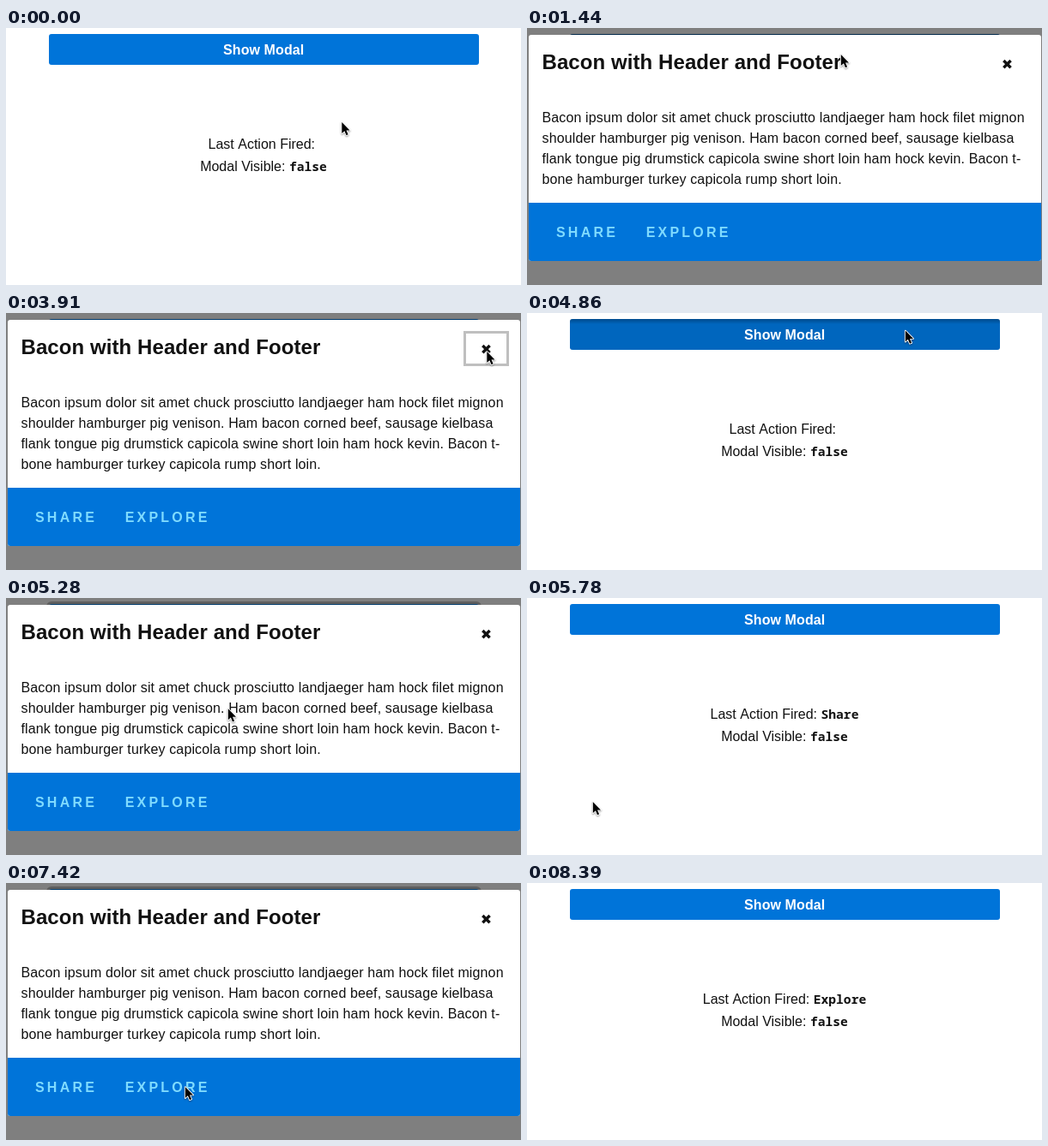
These frames come from a looping animation (600 px wide and 300 px high, 9140 ms). An HTML page with a canvas:

```html
<!DOCTYPE html>
<html lang="en">
<head>
<meta charset="utf-8">
<title>Modal demo</title>
<style>
  html, body { margin: 0; width: 100%; height: 100%; overflow: hidden; background: #fff; }
  canvas { display: block; width: 600px; height: 300px; }
</style>
</head>
<body>
<canvas id="stage" width="600" height="300"></canvas>
<script>
const ctx = document.getElementById('stage').getContext('2d');
const LOOP = 9140, STEP = 30;
const SANS = '"Liberation Sans", Arial, sans-serif';
const MONO = '"Noto Sans Mono", monospace';
const BLUE = '#0074d9', INK = '#111', RING = 'rgba(0,0,0,.25)';

const BODY = [
  'Bacon ipsum dolor sit amet chuck prosciutto landjaeger ham hock filet mignon',
  'shoulder hamburger pig venison. Ham bacon corned beef, sausage kielbasa',
  'flank tongue pig drumstick capicola swine short loin ham hock kevin. Bacon t-',
  'bone hamburger turkey capicola rump short loin.'
];

// open: modal appears, move: pointer leaves the trigger, press: a modal button is held, close: modal goes
const SESSIONS = [
  { down: 1440, open: 1440, move: 1950, press: 3910, close: 3940, target: 'close', action: '' },
  { down: 4860, open: 4890, move: 5070, press: 5750, close: 5780, target: 'share', action: 'Share' },
  { down: 6820, open: 6850, move: 7000, press: 7810, close: 7840, target: 'explore', action: 'Explore' }
];

const BUTTONS = {
  close: [536, 24, 47, 35],
  share: [18, 220, 104, 36],
  explore: [122.5, 220, 131, 36]
};

// Pointer moves; "via" bends the path
const START = [390.5, 108.5];
const MOVES = [
  { from: 570, to: 930, end: [365, 29.5] },
  { from: 1950, to: 2400, end: [549, 55], via: [490, 82] },
  { from: 2730, to: 2900, end: [559.5, 43.5] },
  { from: 4360, to: 4590, end: [440, 19] },
  { from: 5070, to: 5520, end: [76, 236.5] },
  { from: 6170, to: 6650, end: [394, 32] },
  { from: 7000, to: 7420, end: [208, 236.5] },
  { from: 8220, to: 8390, end: [415, 303] }
];

function box(x, y, w, h, r, fill) {
  ctx.beginPath();
  ctx.roundRect(x, y, w, h, r);
  ctx.fillStyle = fill;
  ctx.fill();
}

function ring([x, y, w, h], r) {
  ctx.beginPath();
  ctx.roundRect(x - 3, y - 3, w + 6, h + 6, r ? r + 3 : 0);
  ctx.roundRect(x, y, w, h, r);
  ctx.fillStyle = RING;
  ctx.fill('evenodd');
}

function text(str, x, y, font, color = INK, spacing = 0) {
  ctx.font = font;
  ctx.letterSpacing = spacing + 'px';
  ctx.fillStyle = color;
  ctx.fillText(str, x, y);
  return ctx.measureText(str).width;
}

function statusLine(label, value, y) {
  const plain = '16px ' + SANS, code = 'bold 14.67px ' + MONO;
  ctx.letterSpacing = '0px';
  ctx.font = plain;
  const labelWidth = ctx.measureText(label).width;
  ctx.font = code;
  const x = 300 - (labelWidth + ctx.measureText(value).width) / 2;
  text(label, x, y, plain);
  text(value, x + labelWidth, y, code);
}

function drawPage(pressed, focused, action) {
  const trigger = [50, 7, 501, 36];
  ctx.fillStyle = '#fff';
  ctx.fillRect(0, 0, 600, 300);
  if (focused) ring(trigger, 3);
  box(...trigger, 3, BLUE);
  if (pressed) {
    box(...trigger, 3, 'rgba(0,0,0,.125)');
    const shade = ctx.createLinearGradient(0, 7, 0, 13);
    shade.addColorStop(0, 'rgba(0,0,0,.25)');
    shade.addColorStop(.3, 'rgba(0,0,0,.19)');
    shade.addColorStop(1, 'rgba(0,0,0,0)');
    box(...trigger, 3, shade);
  }
  text('Show Modal', 253, 31, 'bold 16px ' + SANS, '#fff', 0.1);
  statusLine('Last Action Fired: ', action, 141);
  statusLine('Modal Visible: ', 'false', 167);
}

function drawModal(held) {
  ctx.fillStyle = 'rgba(0,0,0,.5)';
  ctx.fillRect(0, 0, 600, 300);
  box(2, 8, 597, 264, 3, '#fff');
  box(2, 204, 597, 68, [0, 0, 3, 3], BLUE);
  text('Bacon with Header and Footer', 17.5, 48, 'bold 24px ' + SANS, INK, 0.08);
  text('✖', 552.7, 48, 'bold 16px "DejaVu Sans", sans-serif');
  BODY.forEach((line, i) => text(line, 17.5, 110 + i * 24, '16px ' + SANS, INK, 0.13));
  const link = 'bold 16px ' + SANS;
  text('SHARE', 34, 244, link, '#7fdbff', 3.2);
  text('EXPLORE', 138.7, 244, link, '#7fdbff', 3.2);
  if (held) ring(BUTTONS[held], 0);
}

function pointerAt(t) {
  let pos = START;
  for (const { from, to, end, via } of MOVES) {
    if (t < from) break;
    if (t >= to) { pos = end; continue; }
    const k = (Math.floor((t - from) / STEP) + 1) * STEP / (to - from + STEP);
    const p = Math.min(1, k * k * (3 - 2 * k)), q = 1 - p, start = pos;
    pos = start.map((a, i) => {
      const mid = via ? via[i] : (a + end[i]) / 2;
      return q * q * a + 2 * q * p * mid + p * p * end[i];
    });
  }
  return pos;
}

const ARROW = new Path2D('M.8 1.6V14.6L3.9 11.7L6 16.7L8.1 15.8L6 10.9H10Z');

function drawPointer([x, y]) {
  ctx.save();
  ctx.translate(x, y);
  ctx.save();
  ctx.shadowColor = 'rgba(0,0,0,.4)';
  ctx.shadowBlur = 2;
  ctx.shadowOffsetY = 1;
  ctx.strokeStyle = '#fff';
  ctx.lineWidth = 1.8;
  ctx.lineJoin = 'round';
  ctx.stroke(ARROW);
  ctx.restore();
  ctx.fillStyle = '#000';
  ctx.fill(ARROW);
  ctx.restore();
}

function draw(t) {
  const now = SESSIONS.find(s => t >= s.down && t < s.close);
  const done = SESSIONS.filter(s => t >= s.close).pop();
  const pressed = now && t < now.move;
  const focused = now && t >= now.move && t < now.press;
  drawPage(pressed, focused, done ? done.action : '');
  if (now && t >= now.open) drawModal(t >= now.press && now.target);
  if (t < 8390) drawPointer(pointerAt(t));
}

const begin = performance.now();
function tick() {
  draw((performance.now() - begin) % LOOP);
  requestAnimationFrame(tick);
}
tick();
</script>
</body>
</html>
```
